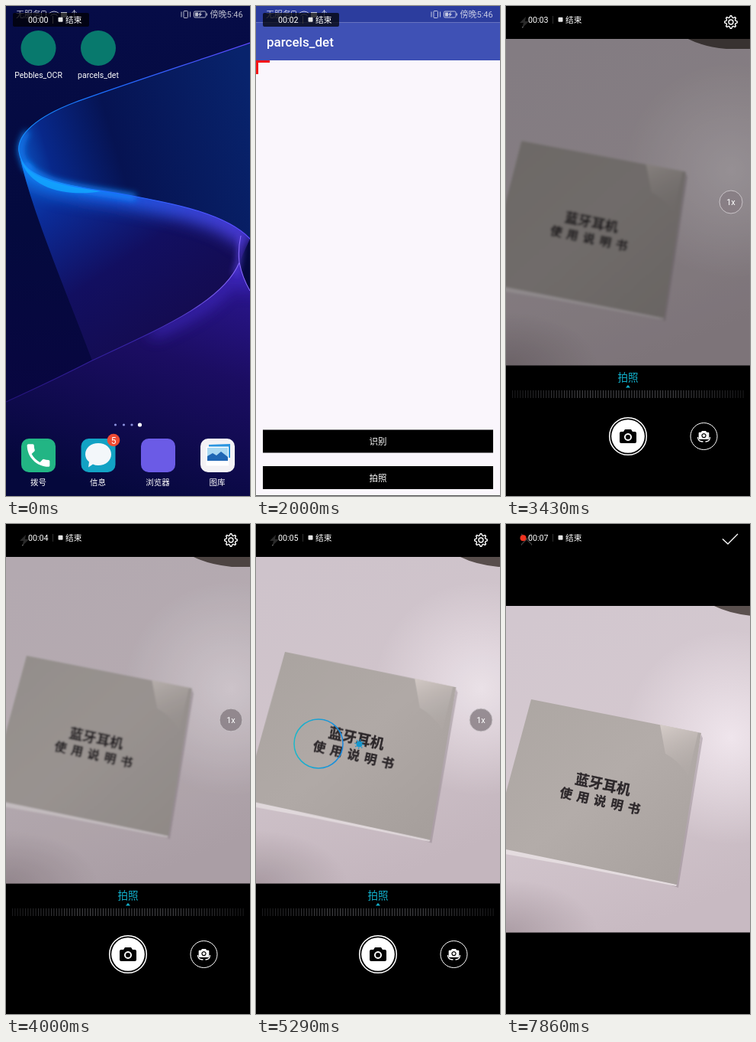
Recreate the animation shown at these times as an HTML page. Size 320 by 640 pixels, loop 8 s.

```html
<!DOCTYPE html>
<html lang="zh">
<head>
<meta charset="utf-8">
<title>Screen recording</title>
<style>
html, body { margin: 0; width: 100%; height: 100%; overflow: hidden; background: #000; }
svg { display: block; width: 100vw; height: 100vh; }
text { font-family: Roboto, "Noto Sans CJK SC", "Noto Sans CJK", sans-serif; fill: #fff; }
.mid { text-anchor: middle; }
.print { font-family: "Noto Sans CJK SC", "Noto Sans CJK", sans-serif; font-weight: 700; fill: #2c272a; stroke: #2c272a; stroke-width: .3; }
.line { fill: none; stroke: #fff; }
</style>
</head>
<body>
<svg viewBox="0 0 320 640" preserveAspectRatio="none">
<defs>
  <linearGradient id="night" x2="0" y2="1">
    <stop stop-color="#060c47"/><stop offset=".45" stop-color="#040a3e"/><stop offset=".8" stop-color="#080640"/><stop offset="1" stop-color="#04093a"/>
  </linearGradient>
  <linearGradient id="fold" gradientUnits="userSpaceOnUse" x1="17" y1="200" x2="320" y2="110">
    <stop stop-color="#0b55c4"/><stop offset=".12" stop-color="#08288a"/><stop offset=".4" stop-color="#061352"/><stop offset="1" stop-color="#08236c"/>
  </linearGradient>
  <linearGradient id="sheet" x1="0" y1="0" x2=".75" y2="1">
    <stop stop-color="#0b5ad0"/><stop offset=".25" stop-color="#0b2c98"/><stop offset=".55" stop-color="#120f60"/><stop offset="1" stop-color="#150a4a"/>
  </linearGradient>
  <linearGradient id="floor" x1=".8" y1="0" x2=".45" y2="1">
    <stop stop-color="#2b1690"/><stop offset=".4" stop-color="#1b0d62"/><stop offset="1" stop-color="#05083c"/>
  </linearGradient>
  <linearGradient id="edge" gradientUnits="userSpaceOnUse" x1="17" y1="0" x2="320" y2="0">
    <stop stop-color="#1590ff"/><stop offset=".4" stop-color="#1c6cff"/><stop offset="1" stop-color="#5f48ff"/>
  </linearGradient>
  <linearGradient id="rim" gradientUnits="userSpaceOnUse" x1="0" y1="0" x2="310" y2="0">
    <stop stop-color="#24127a"/><stop offset=".6" stop-color="#3b27b0"/><stop offset="1" stop-color="#8a6cff"/>
  </linearGradient>
  <linearGradient id="ticks" gradientUnits="userSpaceOnUse" x1="6" y1="0" x2="313" y2="0">
    <stop stop-color="#1a1a1c"/><stop offset=".3" stop-color="#4a4a4e"/><stop offset=".7" stop-color="#4a4a4e"/><stop offset="1" stop-color="#1a1a1c"/>
  </linearGradient>
  <linearGradient id="desk" x1=".2" y1="0" x2=".5" y2="1">
    <stop stop-color="#d2c7cf"/><stop offset=".5" stop-color="#d4c8cf"/><stop offset="1" stop-color="#c8bac2"/>
  </linearGradient>
  <radialGradient id="glow"><stop stop-color="#efe5ec"/><stop offset="1" stop-color="#efe5ec" stop-opacity="0"/></radialGradient>
  <radialGradient id="shade"><stop stop-color="#8d7d85" stop-opacity=".5"/><stop offset="1" stop-color="#8d7d85" stop-opacity="0"/></radialGradient>
  <linearGradient id="paper" x2="1" y2="1">
    <stop stop-color="#aca6a2"/><stop offset=".5" stop-color="#b3aca9"/><stop offset="1" stop-color="#a7a09d"/>
  </linearGradient>
  <linearGradient id="shine" x2=".3" y2="1"><stop stop-color="#d6cdc9"/><stop offset="1" stop-color="#b8b0ad" stop-opacity=".2"/></linearGradient>
  <linearGradient id="focusInk" x2="1"><stop stop-color="#1bb8c9"/><stop offset="1" stop-color="#1686e0"/></linearGradient>
  <filter id="soft" filterUnits="userSpaceOnUse" width="360" height="640"><feGaussianBlur stdDeviation="4"/></filter>
  <filter id="wide" filterUnits="userSpaceOnUse" width="360" height="640"><feGaussianBlur stdDeviation="10"/></filter>
  <filter id="haze" filterUnits="userSpaceOnUse" x="-80" y="-20" width="340" height="300"><feGaussianBlur id="haziness" stdDeviation="0"/></filter>
  <clipPath id="view"><rect y="43" width="320" height="426.500"/></clipPath>
  <path id="sheetShape" d="M17 190C23 234 95 235 160 247S290 272 320 304L306 335C285 385 210 418 113 463C80 375 30 260 17 190z"/>
  <path id="floorShape" d="M0 517Q60 490 113 463C210 418 285 385 306 335Q310 355 320 372V640H0z"/>
  <clipPath id="inSheet"><use href="#sheetShape"/></clipPath>
  <clipPath id="inFloor"><use href="#floorShape"/></clipPath>
  <g id="cam">
    <path fill-rule="evenodd" d="M-4-9h8l2 3h3q2 0 2 2v11q0 2-2 2h-18q-2 0-2-2v-11q0-2 2-2h3zM0-4a5 5 0 1 0 .01 0z"/>
    <circle cy="1" r="3.100"/>
  </g>
</defs>

<g id="home">
  <rect width="320" height="640" fill="url(#night)"/>
  <path fill="url(#fold)" d="M320 48C250 72 150 104 90 126C40 145 14 168 17 190C23 234 95 235 160 247S290 272 320 304z"/>
  <use href="#sheetShape" fill="url(#sheet)"/>
  <g clip-path="url(#inSheet)">
    <path d="M17 190C23 234 95 235 160 247S290 272 320 304" class="line" style="stroke:url(#edge)" stroke-width="34" opacity=".75" filter="url(#wide)"/>
  </g>
  <use href="#floorShape" fill="url(#floor)"/>
  <g clip-path="url(#inFloor)">
    <path d="M190 427Q290 385 306 335Q310 355 320 372" class="line" style="stroke:#4a32d8" stroke-width="14" opacity=".7" filter="url(#wide)"/>
  </g>
  <path d="M28 164C12 186 20 205 34 214" class="line" style="stroke:#1387ff" stroke-width="6" filter="url(#soft)"/>
  <path d="M24 206C50 236 100 238 170 250" class="line" style="stroke:#1387ff" stroke-width="8" filter="url(#soft)"/>
  <path d="M300 350Q307 335 308 300" class="line" style="stroke:#5a40e8" stroke-width="5" filter="url(#soft)"/>
  <path d="M19 200C34 228 85 233 125 242C85 249 32 242 19 200z" fill="#12a6ff" opacity=".85"/>
  <path d="M320 48C250 72 150 104 90 126C40 145 14 168 17 190C23 234 95 235 160 247S290 272 320 304" class="line" style="stroke:url(#edge)" stroke-width="1.200"/>
  <path d="M0 517Q60 490 113 463C210 418 285 385 306 335Q310 355 320 372M306 335Q304 318 308 300" class="line" style="stroke:url(#rim)" stroke-width="1.100"/>
  <g fill="#08796d"><circle cx="42.500" cy="55" r="23"/><circle cx="121" cy="55" r="23"/></g>
  <g class="mid" font-size="10.500">
    <text x="42.500" y="94">Pebbles_OCR</text><text x="121" y="94">parcels_det</text>
    <text x="42.500" y="626">拨号</text><text x="120.500" y="626">信息</text><text x="199" y="626">浏览器</text><text x="277" y="626">图库</text>
  </g>
  <g fill="#8b90dc"><circle cx="143.500" cy="547" r="1.600"/><circle cx="154.500" cy="547" r="1.600"/><circle cx="165" cy="547" r="1.600"/></g>
  <circle cx="175.500" cy="547" r="2.600" fill="#fff"/>
  <rect x="20" y="565" width="45" height="44" rx="10" fill="#22b584"/>
  <path transform="translate(22.700 567.200) scale(1.650)" fill="#fff" d="M6.600 10.800c1.400 2.800 3.800 5.100 6.600 6.600l2.200-2.200q.5-.4 1-.2 1.700.6 3.600.6 1 0 1 1V20q0 1-1 1C10.600 21 3 13.400 3 4q0-1 1-1h3.500q1 0 1 1 0 1.900.6 3.600.1.600-.2 1z"/>
  <rect x="98.500" y="565" width="45" height="44" rx="10" fill="#12a2c4"/>
  <path fill="#f3f7fa" d="M121 571c9.500 0 17 6 17 14.500s-7.500 14.500-17 14.500q-4 0-7-1.500l-6 4 1-7q-5-4-5-10c0-8.500 7.500-14.500 17-14.500z"/>
  <circle cx="141" cy="567" r="8.300" fill="#ef4a33"/>
  <text x="141" y="571.500" class="mid" font-size="12">5</text>
  <rect x="177" y="565" width="45" height="44" rx="10" fill="#6b5be6"/>
  <rect x="255" y="565" width="45" height="44" rx="10" fill="#f3f2f5"/>
  <path fill="#2b95e0" d="M266 573l28-1v18h-28z"/>
  <rect x="262.500" y="575.500" width="29.500" height="25" fill="#fff"/>
  <rect x="264" y="577" width="27" height="17" fill="#a9d8f2"/>
  <path fill="#1f66b4" d="M264 594v-6l7-4 5 3 6-5 9 7v5z"/>
</g>

<g id="app">
  <rect width="320" height="640" fill="#faf6fc"/>
  <rect width="320" height="21.500" fill="#2c3d9e"/>
  <rect y="639" width="320" height="1" fill="#555"/>
  <g id="content">
    <rect y="21.500" width="320" height="49.500" fill="#3f51b5"/>
    <text x="14" y="53" font-size="17" font-weight="500">parcels_det</text>
    <path fill="#f31414" d="M0 71h18v3H3v15H0z"/>
    <path d="M9 553.500h302v30H9zM9 601h302v30H9z"/>
    <g class="mid" font-size="11.500"><text x="160" y="573">识别</text><text x="160" y="621">拍照</text></g>
  </g>
</g>

<rect id="panel" width="320" height="640"/>

<g id="status" opacity=".72">
  <text x="13" y="15" font-size="11">无服务</text>
  <g class="line">
    <rect x="46.500" y="6.500" width="6" height="9" rx="1"/><path d="M56 10q7-6 14 0M58.500 12.500q4.500-4 9 0"/>
    <path d="M89.500 5v11M86.500 9l3-3 3 3"/>
    <rect x="233" y="6.500" width="5.500" height="9" rx="1"/><path d="M230 7.500v7M241.500 7.500v7"/>
    <rect x="246.500" y="7" width="15.500" height="8" rx="1.500"/><path d="M263.500 9.500v3"/>
  </g>
  <path fill="#fff" d="M72 8h8v7h-8zM248 8.500h4v5h-4zM256 7.500l-4.500 4h2.500l-1 3 4.500-4h-2.500z"/>
  <text x="267.500" y="15" font-size="11">傍晚5:46</text>
</g>

<g id="camera">
  <rect width="320" height="640"/>
  <g id="scene" clip-path="url(#view)">
    <rect y="43" width="320" height="427" fill="url(#desk)"/>
    <ellipse cx="295" cy="215" rx="140" ry="140" fill="url(#glow)"/>
    <ellipse cx="0" cy="470" rx="120" ry="70" fill="url(#shade)"/>
    <path id="object" fill="#5a504e" d="M0 43Q20 53 50 56H100V43z"/>
    <g id="card">
      <g filter="url(#haze)">
        <path fill="#857980" opacity=".4" d="M223 46l2 5-32 195-9-3z"/>
        <path fill="#e4dcdf" d="M-52 190L191 242l-1 2-150-29-92-16z"/>
        <path fill="url(#paper)" d="M0 0L223 44 191 242-52 192z"/>
        <path fill="url(#shine)" d="M169 33l50 10-13 56q-14-20-30-28z"/>
        <text class="print" font-size="18.500" transform="translate(56.500 110) rotate(12)">蓝牙耳机</text>
        <text class="print" font-size="16.500" letter-spacing="6.300" transform="translate(36.500 127) rotate(12.500)">使用说明书</text>
      </g>
    </g>
    <rect id="gloom" y="43" width="320" height="427"/>
  </g>
  <g id="controls">
    <path fill="#999" d="M26 14l-8 8h5l-2 7 9-9h-5z"/>
    <path id="gear" class="line" stroke-width="1.400" stroke-linejoin="round" transform="translate(295 21)"/>
    <circle cx="295" cy="21" r="3" class="line" stroke-width="1.400"/>
    <circle cx="295" cy="256" r="15" fill="#867d82" fill-opacity=".82" stroke="#c9c3c7"/>
    <text x="295" y="260" class="mid" font-size="11">1x</text>
    <text x="160" y="490" class="mid" font-size="13.500" style="fill:#12b4d0">拍照</text>
    <path fill="#12b4d0" d="M157 498.500l3-3.500 3 3.500z"/>
    <path d="M8 507H312" stroke="url(#ticks)" stroke-width="10" stroke-dasharray="1 2.400"/>
    <g id="shutter">
      <circle r="24.300" class="line" stroke-width="1.500"/><circle r="21.800" fill="#fff"/><use href="#cam"/>
    </g>
    <g transform="translate(259.500 562)">
      <circle r="17.500" class="line"/>
      <use href="#cam" transform="translate(0 -1.500) scale(.62)" fill="#fff"/>
      <path class="line" stroke-width="1.300" d="M-8 1q0 6 7 6M8 1q0 6-6 6"/>
    </g>
    <g id="focus">
      <circle id="ring" cx="82" cy="287" class="line" style="stroke:url(#focusInk)" stroke-width="1.500"/>
      <circle cx="135.500" cy="287.500" r="4" fill="#1597cf"/>
      <circle cx="135.500" cy="287.500" r="5.500" class="line" style="stroke:#1597cf" stroke-width="1.500" stroke-dasharray="1.400 2.920"/>
    </g>
  </g>
  <g id="review" class="line" stroke-width="1.300">
    <path d="M20 13l14 14M34 13L20 27" opacity=".85"/><path d="M284 19.500l7 6.500 13-13"/>
  </g>
</g>

<rect x="9" y="9" width="100" height="18" rx="2" opacity=".72"/>
<circle id="dot" cx="22.500" cy="18.300" r="4" fill="#f2331f"/>
<text id="clock" x="29" y="22" font-size="10.700"></text>
<path d="M61.500 13v10" stroke="#444" stroke-width=".7"/>
<rect x="68.500" y="14.800" width="6" height="6" rx="1" fill="#e4e4e4"/>
<text x="78" y="22" font-size="10.700">结束</text>
</svg>

<script>
const LOOP = 8000;
const OPEN = 380, CONTENT = 1640, SLIDE = 2690, CAMERA = 3130, REVIEW = 5960;
const el = Object.fromEntries([...document.querySelectorAll('[id]')].map(n => [n.id, n]));
const clamp = v => Math.min(1, Math.max(0, v));
const span = (t, start, length) => clamp((t - start) / length);
const easeOut = u => 1 - (1 - u) ** 3;
const mix = (a, b, u) => a + (b - a) * u;
const show = (node, on) => node.setAttribute('display', on ? 'inline' : 'none');
const set = (node, attrs) => { for (const k in attrs) node.setAttribute(k, attrs[k]); };

// time, card x, card y, scale, turn, blur, gloom, object x
const poses = [
  [3130, 18, 178, .96, -.8, 2.2, .2, 236],
  [4000, 27, 172, .973, 0, 1.1, .15, 246],
  [4700, 35, 168, 1, .4, .3, .04, 262],
  [5290, 38, 167, 1.008, .5, 0, .02, 268],
  [5800, 33, 165, 1, 0, 0, 0, 273]
];

function poseAt(t) {
  const found = poses.findIndex(p => p[0] >= t);
  const next = found < 0 ? poses.length - 1 : Math.max(1, found);
  const a = poses[next - 1], b = poses[next];
  const u = span(t, a[0], b[0] - a[0]);
  return a.map((v, k) => mix(v, b[k], u * u * (3 - 2 * u)));
}

function gearPath() {
  const points = [];
  for (let i = 0; i < 32; i++) {
    const angle = (i - .5) * Math.PI / 16, r = i % 4 < 2 ? 8.3 : 6.2;
    points.push((r * Math.cos(angle)).toFixed(2) + ' ' + (r * Math.sin(angle)).toFixed(2));
  }
  return 'M' + points.join('L') + 'z';
}

function drawApp(t) {
  const u = easeOut(span(t, OPEN, 420));
  show(el.home, u < 1);
  show(el.app, u > 0 && t < CAMERA);
  set(el.app, {
    transform: `translate(${mix(98, 0, u)} ${mix(32, 0, u)}) scale(${mix(46 / 320, 1, u)} ${mix(46 / 640, 1, u)})`,
    opacity: clamp(u * 2)
  });
  show(el.content, t >= CONTENT);
  show(el.panel, t >= SLIDE);
  set(el.panel, { x: 320 * (1 - easeOut(span(t, SLIDE, 400))), opacity: mix(.952, 1, span(t, 2900, 200)) });
  show(el.status, t < CAMERA);
}

function drawCamera(t) {
  const review = t >= REVIEW;
  show(el.camera, t >= CAMERA);
  show(el.controls, !review);
  show(el.review, review);
  const [, x, y, scale, turn, blur, gloom, objectX] = poseAt(t);
  set(el.scene, { transform: `translate(0 ${review ? 64 : 0})`, opacity: span(t, 3200, 300) });
  set(el.card, { transform: `translate(${x} ${y}) rotate(${turn}) scale(${scale})` });
  set(el.haziness, { stdDeviation: blur });
  set(el.gloom, { opacity: gloom });
  set(el.object, { transform: `translate(${objectX} 0)` });
  show(el.focus, t >= 4820 && t < 5640);
  set(el.ring, { r: mix(40, 32, easeOut(span(t, 4820, 250))) });
  const press = Math.sin(Math.PI * span(t, 5480, 260));
  set(el.shutter, { transform: `translate(160 562) scale(${1 - .1 * press})` });
}

function draw(t) {
  drawApp(t);
  drawCamera(t);
  const beat = t % 1000;
  show(el.dot, beat >= 520 && beat < 970);
  el.clock.textContent = '00:0' + Math.min(7, Math.floor((t + 30) / 1000));
}

set(el.gear, { d: gearPath() });
const start = performance.now();
function tick() {
  draw((performance.now() - start) % LOOP);
  requestAnimationFrame(tick);
}
tick();
</script>
</body>
</html>
```
